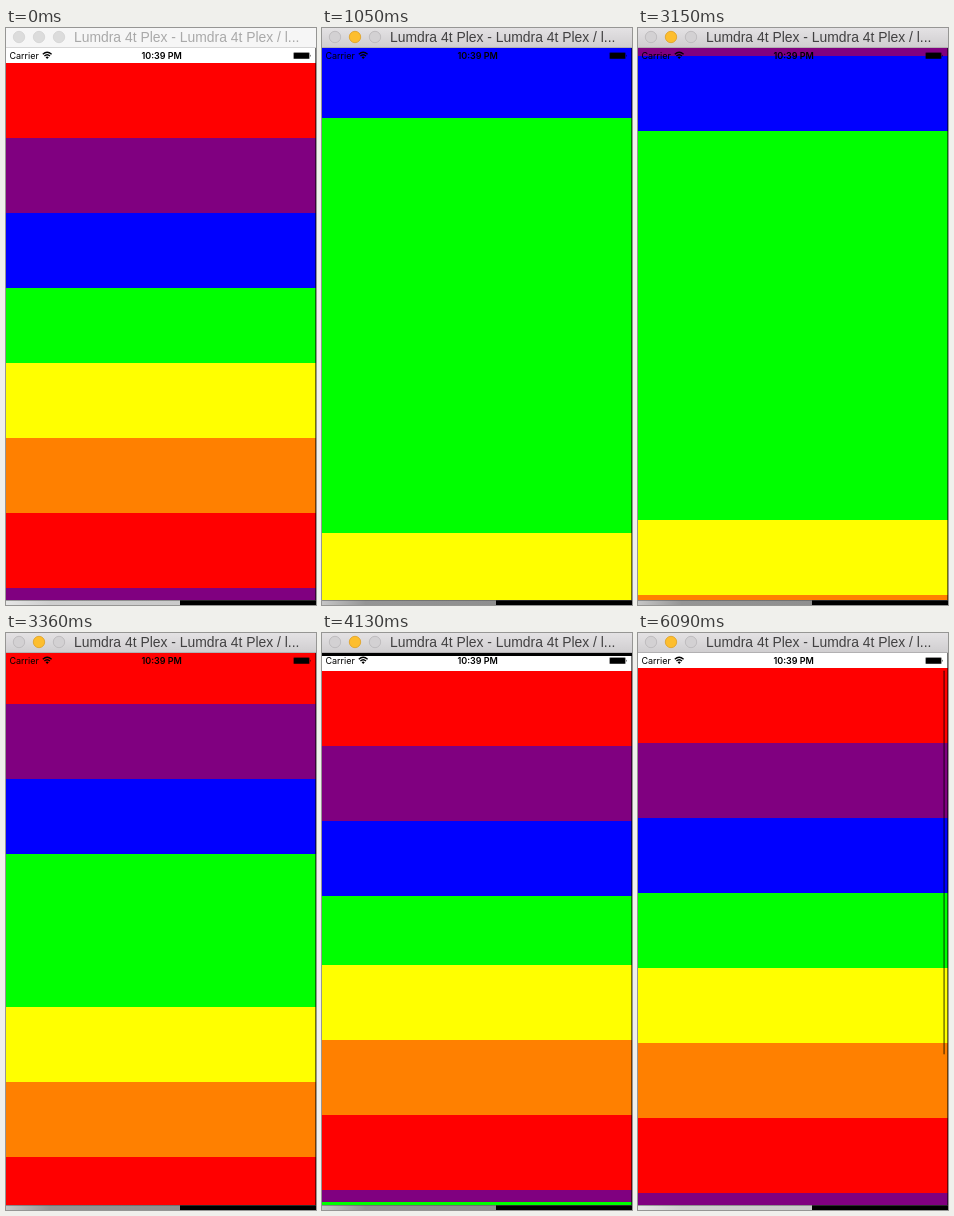
Write an HTML page without scripts that moves like this. It is 310 px wide and 577 px high and loops after 6.16 s.

```html
<!DOCTYPE html>
<html lang="en">
<head>
<meta charset="utf-8">
<title>Expanding row</title>
<style>
@property --tick { syntax: "<number>"; inherits: true; initial-value: 0; }

html, body { margin: 0; width: 100%; height: 100%; overflow: hidden; background: #000; }

/* One tick is 70 ms. Each spring runs from its own start time, in seconds. */
#stage {
  display: block;
  width: 310px;
  height: 577px;
  --open: max(0, var(--tick) * .07 - .8135);
  --shut: max(0, var(--tick) * .07 - 3.02);
  --opening: exp(-4.6 * var(--open)) * (cos(6.14 * var(--open)) + .75 * sin(6.14 * var(--open)));
  --closing: exp(-3.4 * var(--shut)) * (cos(3.96 * var(--shut)) + .305 * sin(3.96 * var(--shut)));
  --gap: calc(240px * (var(--closing) - var(--opening)));
}
#stage, .active, .light, .bar { animation: 6160ms -2ms infinite; }
#stage { animation-name: clock; }
.active { animation-name: activate; animation-timing-function: step-end; }
.light { animation-name: lighten; animation-timing-function: step-end; }
.bar { animation-name: reveal; }

.up { transform: translateY(calc(-1 * var(--gap))); }
.down { transform: translateY(var(--gap)); }
.up, .down { shape-rendering: crispEdges; }

.title { font: 13.9px "Liberation Sans", Arial, sans-serif; }
.status { font: 9px Inter, sans-serif; }

/* The clock stalls briefly twice while the row is open. */
@keyframes clock {
  0% { --tick: 0; animation-timing-function: steps(17); }
  19.3182% { --tick: 17; animation-timing-function: step-end; }
  22.7273% { --tick: 20; animation-timing-function: steps(2); }
  25% { --tick: 22; animation-timing-function: step-end; }
  27.2727% { --tick: 24; animation-timing-function: steps(64); }
  100% { --tick: 88; }
}
@keyframes activate {
  0% { opacity: 0; }
  9.0909%, 100% { opacity: 1; }
}
@keyframes lighten {
  0% { opacity: 1; }
  9.0909% { opacity: 0; }
  98.8636%, 100% { opacity: 1; }
}
@keyframes reveal {
  0% { opacity: 0; }
  82.9545% { opacity: 0; animation-timing-function: steps(5); }
  88.6364%, 100% { opacity: 1; }
}
</style>
</head>
<body>
<svg id="stage" viewBox="0 0 310 577">
  <defs>
    <linearGradient id="chrome" x2="0" y2="1">
      <stop stop-color="#e4e2e4"/><stop offset="1" stop-color="#cfcdcf"/>
    </linearGradient>
    <linearGradient id="shade">
      <stop stop-color="#c6c6c6"/><stop offset=".25" stop-color="#959595"/><stop offset="1" stop-color="#8f8f8f"/>
    </linearGradient>
    <linearGradient id="pale">
      <stop stop-color="#e6e6e6"/><stop offset=".25" stop-color="#cfcfcf"/><stop offset="1" stop-color="#cacaca"/>
    </linearGradient>
    <clipPath id="screen"><rect y="20" width="310" height="552"/></clipPath>
  </defs>

  <rect width="310" height="577"/>

  <!-- Desktop below the window -->
  <rect y="572" width="174" height="5" fill="url(#shade)"/>
  <rect class="light" y="572" width="174" height="5" fill="url(#pale)"/>
  <rect y="572" width="310" height="1" fill="#555" fill-opacity=".5"/>

  <!-- Title bar, inactive then active -->
  <g>
    <rect width="310" height="20" fill="#f6f6f6"/>
    <rect y="19" width="310" height="1" fill="#d6d6d6"/>
    <g fill="#dcdcdc" stroke="#d0d0d0" stroke-width=".7">
      <circle cx="13" cy="9" r="5.7"/><circle cx="33" cy="9" r="5.7"/><circle cx="53" cy="9" r="5.7"/>
    </g>
    <text class="title" x="68" y="14" fill="#a9a9a9">Lumdra 4t Plex - Lumdra 4t Plex / l...</text>
  </g>
  <g class="active">
    <rect width="310" height="20" fill="url(#chrome)"/>
    <rect y="19" width="310" height="1" fill="#b2b0b2"/>
    <g fill="#d3d1d3" stroke="#b9b7b9" stroke-width=".8">
      <circle cx="13" cy="9" r="5.7"/>
      <circle cx="33" cy="9" r="5.7" fill="#fdbe2e" stroke="#dfa023"/>
      <circle cx="53" cy="9" r="5.7"/>
    </g>
    <text class="title" x="68" y="14" fill="#414041">Lumdra 4t Plex - Lumdra 4t Plex / l...</text>
  </g>

  <!-- The open page hangs from the upper rows and lies under the lower ones -->
  <g clip-path="url(#screen)">
    <rect class="up" y="260" width="310" height="552" fill="#0f0"/>
    <g class="up">
      <rect y="20" width="310" height="15" fill="#fff"/>
      <rect y="35" width="310" height="75" fill="#f00"/>
      <rect y="110" width="310" height="75" fill="#800080"/>
      <rect y="185" width="310" height="75" fill="#00f"/>
    </g>
    <g class="down">
      <rect y="335" width="310" height="75" fill="#ff0"/>
      <rect y="410" width="310" height="75" fill="#ff8000"/>
      <rect y="485" width="310" height="75" fill="#f00"/>
      <rect y="560" width="310" height="12" fill="#800080"/>
    </g>
  </g>

  <!-- Status bar -->
  <g class="status">
    <text x="3.4" y="31">Carrier</text>
    <text x="155.7" y="31" text-anchor="middle" font-weight="600">10:39 PM</text>
    <path d="M36.8 26.2Q41.2 22.2 45.6 26.2M38.4 28Q41.2 25.4 44 28" fill="none" stroke="#000" stroke-width="1.3"/>
    <path d="M39.6 29.2Q41.2 27.8 42.8 29.2L41.2 31Z"/>
    <rect x="287.3" y="24.3" width="16.4" height="6.8" rx="1.2" fill-opacity=".55"/>
    <rect x="288" y="25" width="15" height="5.4" rx=".5"/>
    <path d="M304.3 26.4q1.3 1.3 0 2.6z"/>
  </g>

  <rect class="bar" x="305.3" y="37.5" width="1.6" height="384" rx=".8" fill-opacity=".5"/>
  <rect x="309" y="20" width="1" height="552" fill-opacity=".55"/>
</svg>
</body>
</html>
```
